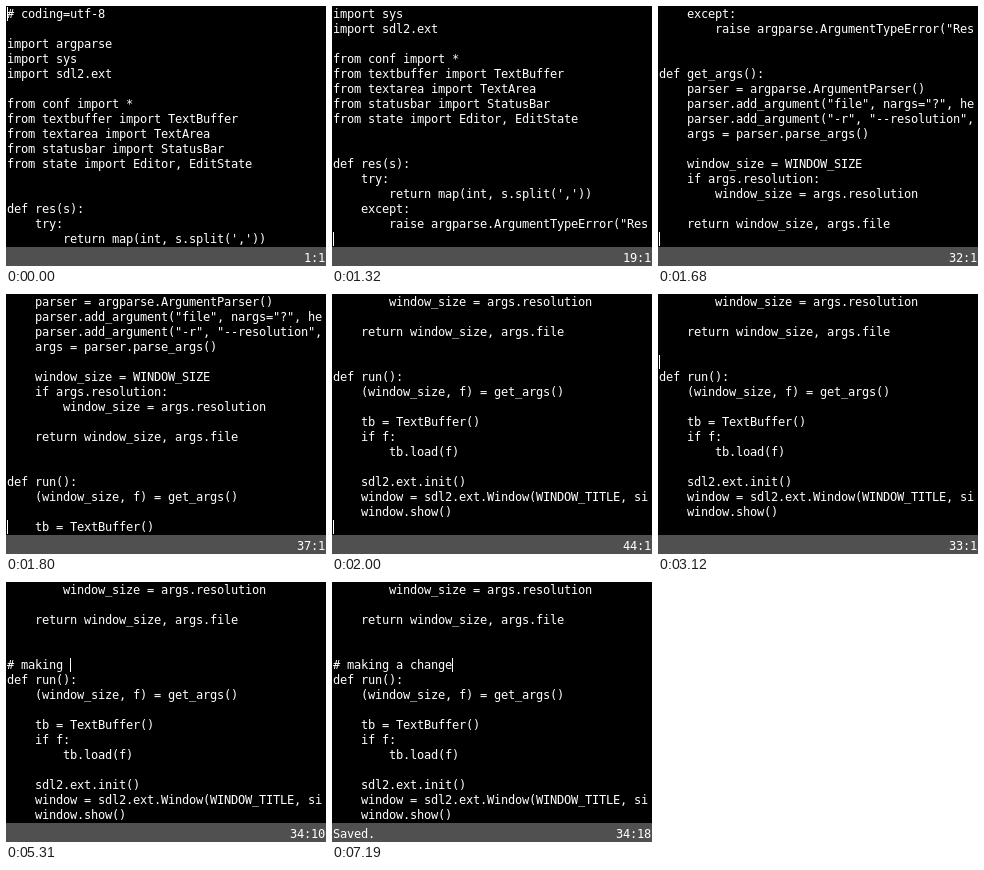
An HTML page with a canvas that plays this animation: 320 px wide and 260 px high, repeating every 8000 ms.

```html
<!DOCTYPE html>
<html lang="en">
<head>
<meta charset="utf-8">
<title>Text editor</title>
<style>
  html, body { margin: 0; width: 100%; height: 100%; overflow: hidden; background: #000; }
  canvas { display: block; width: 320px; height: 260px; }
</style>
</head>
<body>
<canvas id="screen" width="320" height="260"></canvas>
<script>
const LOOP = 8000, CELL = 7, ROW = 15, ROWS = 16, COLS = 45, LEFT = 1, TICK = 40;
const NEWLINE_AT = 3550, SAVED_AT = 7190, EDIT_LINE = 34;

const code = `# coding=utf-8

import argparse
import sys
import sdl2.ext

from conf import *
from textbuffer import TextBuffer
from textarea import TextArea
from statusbar import StatusBar
from state import Editor, EditState


def res(s):
    try:
        return map(int, s.split(','))
    except:
        raise argparse.ArgumentTypeError("Res


def get_args():
    parser = argparse.ArgumentParser()
    parser.add_argument("file", nargs="?", he
    parser.add_argument("-r", "--resolution",
    args = parser.parse_args()

    window_size = WINDOW_SIZE
    if args.resolution:
        window_size = args.resolution

    return window_size, args.file


def run():
    (window_size, f) = get_args()

    tb = TextBuffer()
    if f:
        tb.load(f)

    sdl2.ext.init()
    window = sdl2.ext.Window(WINDOW_TITLE, si
    window.show()
`.split('\n');

// Cursor moves: start time, line, then for a held key: ms per line and last line
const moves = [
  [0, 1], [390, 2], [880, 3, 27, 44],
  [2090, 43], [2170, 42], [2700, 41, 27, 34],
  [3120, 33], [NEWLINE_AT, EDIT_LINE]
];

const typed = '# making a change';
const keyTimes = [
  3990, 4250, 4460, 4590, 4720, 4850, 5020, 5230, 5310,
  5440, 5520, 5690, 5790, 5880, 5980, 6190, 6360
];

const ctx = document.getElementById('screen').getContext('2d', { alpha: false });

function lineAt(t) {
  const [start, line, rate, last] = moves.findLast(m => m[0] <= t);
  if (!rate) return line;
  const held = Math.floor((t - start) / TICK) * TICK;
  const count = Math.min(Math.floor(held / rate), Math.abs(last - line));
  return line + Math.sign(last - line) * count;
}

function topAt(t, line) {
  const deepest = t < 2000 ? line : 44;
  return Math.max(1, deepest - ROWS + 1);
}

function write(text, x, baseline) {
  for (let i = 0; i < Math.min(text.length, COLS); i++) {
    if (text[i] !== ' ') ctx.fillText(text[i], x + i * CELL, baseline);
  }
}

function draw(t) {
  const line = lineAt(t), top = topAt(t, line);
  const keys = keyTimes.filter(k => k <= t).length;
  const lines = code.slice();
  if (t >= NEWLINE_AT) lines.splice(EDIT_LINE - 1, 0, typed.slice(0, keys));

  ctx.fillStyle = '#000';
  ctx.fillRect(0, 0, 320, 260);
  ctx.fillStyle = '#505050';
  ctx.fillRect(0, 241, 320, 19);

  ctx.fillStyle = '#fff';
  ctx.font = '12px "DejaVu Sans Mono", monospace';
  for (let r = 0; r < ROWS; r++) {
    write(lines[top - 1 + r] || '', LEFT, r * ROW + 12);
  }
  ctx.fillRect(LEFT + keys * CELL, (line - top) * ROW + 1, 1, 14);

  const place = `${line}:${keys + 1}`;
  write(place, 319 - place.length * CELL, 256);
  if (t >= SAVED_AT) write('Saved.', LEFT, 256);
}

const began = performance.now();
function frame() {
  draw((performance.now() - began) % LOOP);
  requestAnimationFrame(frame);
}
frame();
</script>
</body>
</html>
```
